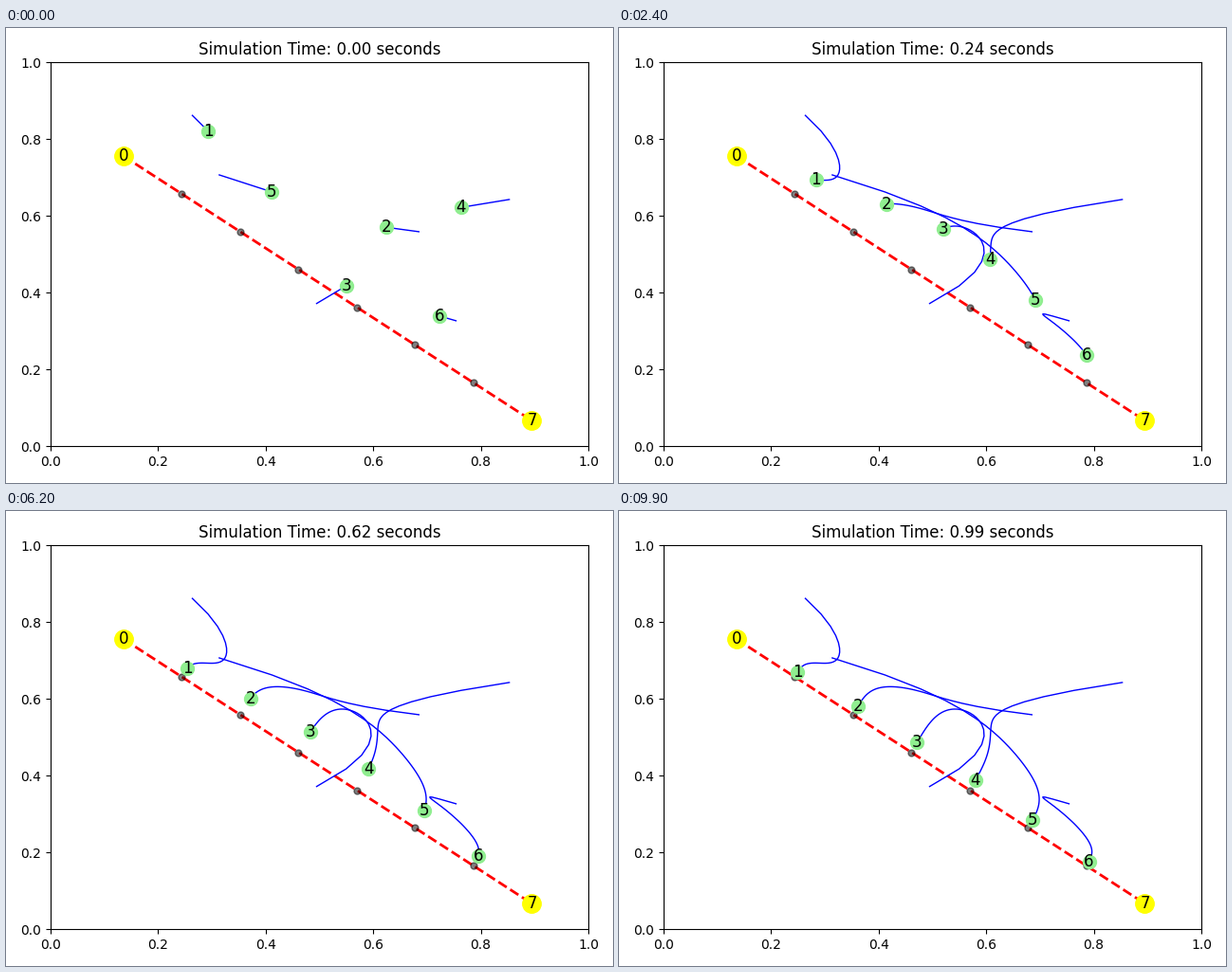
Recreate the animation shown at these times as a matplotlib script. Size 640 by 480 pixels, loop 10000 ms.

```python
import numpy as np
import matplotlib.pyplot as plt
from matplotlib.animation import FuncAnimation

plt.rcParams["font.family"] = "DejaVu Sans"

FRAMES = 100
DT = 0.01
GAIN = 10

# The first and last agents are fixed; the rest move between their neighbours.
START = np.column_stack([
    (0.136, 0.264, 0.685, 0.495, 0.853, 0.314, 0.754, 0.895),
    (0.756, 0.862, 0.559, 0.372, 0.643, 0.707, 0.327, 0.067),
])


def simulate(start, steps):
    path = [start]
    for _ in range(steps):
        p = path[-1].copy()
        p[1:-1] += GAIN * DT * np.diff(p, n=2, axis=0)
        path.append(p)
    return np.array(path)


def title(frame):
    return f"Simulation Time: {frame * DT:.2f} seconds"


path = simulate(START, FRAMES)
goals = np.linspace(START[0], START[-1], len(START))[1:-1]
ends = START[[0, -1]]

fig, ax = plt.subplots(figsize=(6.4, 4.8), dpi=100)
fig.subplots_adjust(left=0.073, right=0.9594, bottom=0.0807, top=0.9243)
ax.set(xlim=(0, 1), ylim=(0, 1))
ax.set_title(title(0))

ax.plot(*ends.T, "r--", lw=2)
ax.plot(*goals.T, "ko", ms=5, alpha=0.5)
trails = [ax.plot([], [], "b-", lw=1)[0] for _ in goals]
ax.plot(*ends.T, "o", color="yellow", ms=14)
agents, = ax.plot(*START[1:-1].T, "o", color="lightgreen", ms=10)
labels = [ax.text(x, y, str(i), fontsize=12, ha="center", va="center")
          for i, (x, y) in enumerate(START)]


def update(frame):
    step = frame + 1
    agents.set_data(*path[step, 1:-1].T)
    for i, trail in enumerate(trails, 1):
        trail.set_data(*path[:step + 1, i].T)
        labels[i].set_position(path[step, i])
    ax.set_title(title(frame))
    return [agents, *trails, *labels]


anim = FuncAnimation(fig, update, frames=FRAMES, interval=100, repeat=True,
                     repeat_delay=0, blit=False)
plt.show()
```
